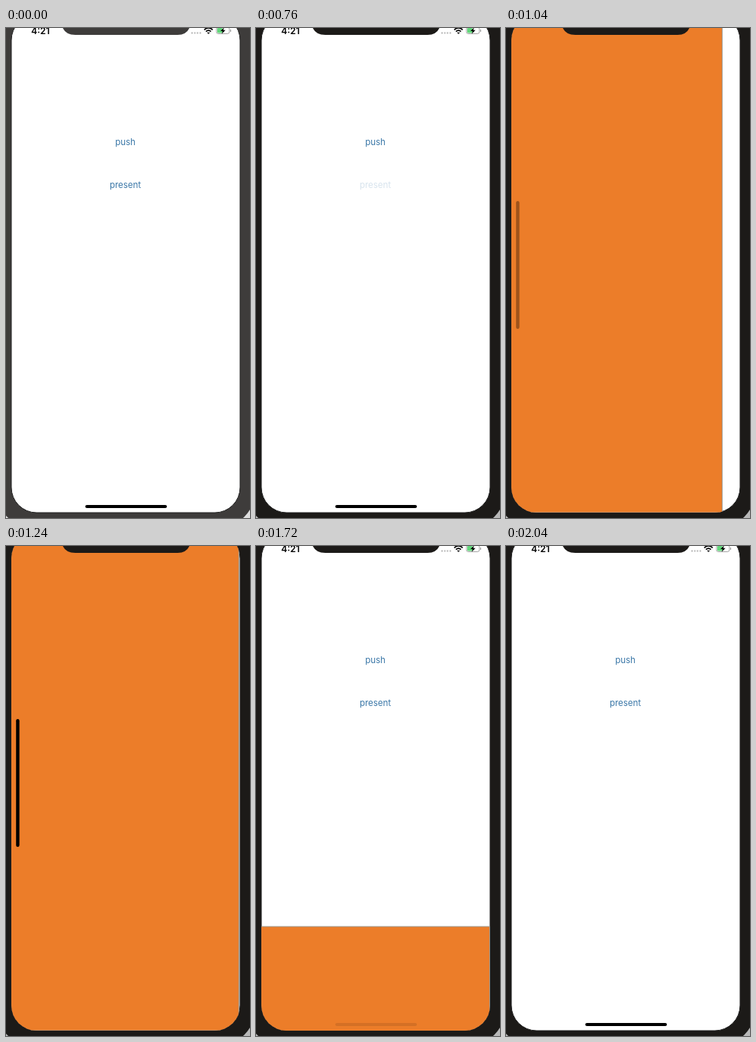
Write an HTML page that moves like this. It is 320 px wide and 640 px high and loops after 2.36 s.

```html
<!DOCTYPE html>
<html lang="en">
<head>
<meta charset="utf-8">
<title>Push and present</title>
<style>
  html, body { margin: 0; width: 100%; height: 100%; overflow: hidden; }
  svg { display: block; width: 320px; height: 640px; font-family: Inter, sans-serif; }
  .link { font-size: 11.5px; fill: #3c78a8; text-anchor: middle; }
</style>
</head>
<body>
<svg viewBox="0 0 320 640">
  <defs>
    <clipPath id="screen"><rect x="7" y="-17" width="300" height="650" rx="33"/></clipPath>
  </defs>
  <rect id="desk" width="320" height="640"/>
  <rect id="bezel" x="-14" y="-38" width="342" height="692" rx="53"/>
  <rect x="7" y="-17" width="300" height="650" rx="33" fill="#fff" stroke="#222" stroke-width="1"/>

  <g clip-path="url(#screen)">
    <text class="link" x="156.5" y="153">push</text>
    <text class="link" x="156.5" y="209" id="present">present</text>
    <rect id="panel" y="-17" width="300" height="650" fill="#ec7d29" stroke="#9c978c"/>
    <rect id="bottomBar" x="104" y="623" width="107" height="4" rx="2"/>
    <rect id="sideBar" x="13.2" y="226" width="4.4" height="167" rx="2.2"/>

    <g id="status">
      <text x="33" y="8" font-size="12" font-weight="600">4:21</text>
      <path d="M243 6.5H256" stroke="#000" stroke-opacity=".28" stroke-width="2" stroke-dasharray="2 1.6"/>
      <g fill="none" stroke="#000" stroke-width="1.7">
        <path d="M260 2.4Q265.5 -2.6 271 2.4M262.2 4.7Q265.5 1.7 268.8 4.7"/>
        <path d="M264.2 6.2H266.8L265.5 7.5Z" stroke-width="1"/>
      </g>
      <rect x="276" y="-1" width="17" height="8.5" rx="2.5" fill="none" stroke="#000" stroke-opacity=".35"/>
      <rect x="277" y="0" width="7" height="6.5" rx="1.4" fill="#62d67b"/>
      <path d="M294.6 2V5" stroke="#000" stroke-opacity=".35" stroke-width="1.2"/>
      <path d="M286 -.8L281.3 4H284L283 7.8L287.8 2.8H285Z"/>
    </g>
  </g>
  <path id="notch" d="M74 -1Q78 9 91 9H225Q237 9 241 -1Z"/>
</svg>

<script>
const LOOP = 2360, STEP = 40;
const PRESENT = 797, DISMISS = 1589;
const get = id => document.getElementById(id);
const set = (id, name, value) => get(id).setAttribute(name, value);

// Linear ramp from 0 to 1 between two times.
const ramp = (t, from, to) => Math.min(1, Math.max(0, (t - from) / (to - from)));

// Critically damped spring from 0 to 1; speed is per millisecond.
function spring(elapsed, speed) {
  const x = Math.max(0, elapsed) * speed;
  return 1 - (1 + x) * Math.exp(-x);
}

function draw(t) {
  const active = t >= 760;
  const body = active ? "#1c1a18" : "#3e3c3b";
  set("desk", "fill", active ? "#b8b8b8" : "#dedede");
  set("bezel", "fill", body);
  set("notch", "fill", body);

  const shown = t >= 1280 ? 1 : spring(t - PRESENT, 0.0174);
  const gone = t >= 2040 ? 1 : spring(t - DISMISS, 0.0224);
  set("panel", "x", 6.5 - 300 * (1 - shown));
  set("panel", "y", -17 + 650 * gone);
  set("panel", "visibility", t < PRESENT || gone === 1 ? "hidden" : "visible");

  set("status", "visibility", t >= 800 && t < 1600 ? "hidden" : "visible");
  set("present", "opacity", active && t < 1400 ? 0.2 + 0.15 * ramp(t, 760, 880) : 1);
  set("bottomBar", "opacity", t < 1300 ? 1 - ramp(t, 800, 980) : ramp(t, 1700, 1900));
  set("sideBar", "opacity", t < 1600 ? ramp(t, 970, 1180) : 1 - ramp(t, 1600, 1700));
}

const start = performance.now();
function tick() {
  const t = (performance.now() - start) % LOOP;
  draw(Math.floor(t / STEP) * STEP);
  requestAnimationFrame(tick);
}
tick();
</script>
</body>
</html>
```
